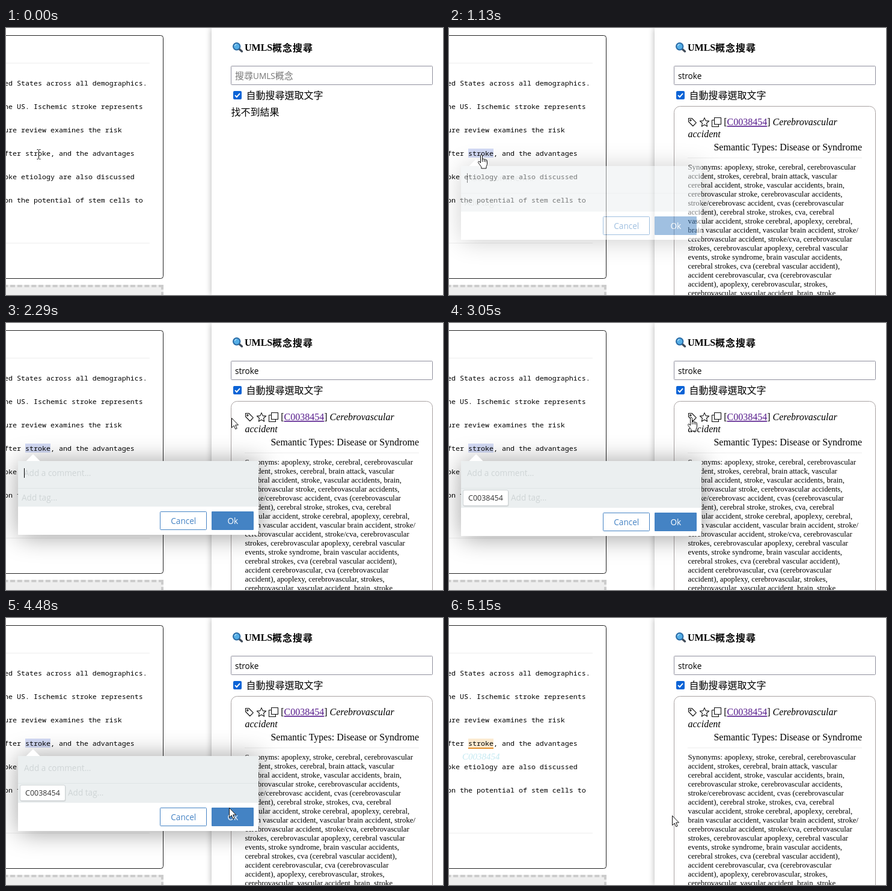
An HTML page that plays this animation: 727x445 px, repeating every 5610 ms.

```html
<!DOCTYPE html>
<html lang="zh-Hant">
<head>
<meta charset="utf-8">
<title>UMLS概念搜尋</title>
<style>
html, body { margin: 0; width: 100%; height: 100%; overflow: hidden; background: #fff; }
#stage { position: absolute; left: 0; top: 0; width: 727px; height: 445px; overflow: hidden; background: #fff; }
#stage > *, #popup > * { position: absolute; left: 0; top: 0; }
svg { display: block; width: 727px; height: 445px; }
#drop { left: -40px; top: 428px; width: 294px; height: 60px; border: 4px dashed #ccc; background: #eee; }
#panel { left: 342px; width: 400px; height: 445px; background: #fff; box-shadow: 0 0 10px rgba(0,0,0,.3); }
#popup { width: 727px; height: 445px; }
#box { left: 20px; top: 230px; width: 400px; height: 123px; background: #fff; box-shadow: 2px 2px 42px rgba(0,0,0,.4); }
text { white-space: pre; }
.mono { font: 11.667px "Noto Sans Mono", monospace; }
.serif { font: 16px "Liberation Serif", serif; }
.small { font: 12.8px "Liberation Serif", serif; }
.cjk { font: 16px "Noto Sans CJK TC", "Noto Sans CJK JP", sans-serif; }
.sans { font: 13.6px "Open Sans", "Noto Sans", sans-serif; }
.hint { fill: #cfd5d6; }
.line { fill: none; stroke: #111; stroke-width: 1.1; stroke-linejoin: round; }
</style>
</head>
<body>
<div id="stage">
  <div id="drop"></div>
  <div id="panel"></div>
  <svg id="page">
    <rect x="-20.5" y="12.5" width="282" height="405" rx="4" fill="#fff" stroke="#222"/>
    <path d="M0 58.5H239M0 358.5H239" stroke="#eee"/>
    <rect id="mark" x="32" y="201" width="42" height="15"/>
    <path id="under" d="M32 217H74" stroke="#e5912d" stroke-width="2"/>
    <g id="article" class="mono"></g>
    <text id="label" x="22" y="236" class="serif" style="font-size:15px;font-style:italic" fill="#c4e9f1">C0038454</text>

    <path d="M388.5 35.5L392.5 39" stroke="#3f4a57" stroke-width="3.4" stroke-linecap="round"/>
    <circle cx="383.7" cy="30.7" r="5.7" fill="#55aee6" stroke="#2b6ca6" stroke-width="2"/>
    <path d="M380.5 30a3.6 3.6 0 0 1 3-2.8" fill="none" stroke="#b7e0f8" stroke-width="1.2"/>
    <text x="397" y="38" class="serif" font-weight="700" style="font-weight:700">UMLS</text>
    <text x="443" y="39" class="cjk" style="font-weight:700;letter-spacing:1px">概念搜尋</text>

    <rect x="374.5" y="63.5" width="335" height="31" rx="1" fill="#fff" stroke="#8f8f9d"/>
    <text id="empty" x="381" y="85" class="cjk" style="font-size:15px" fill="#757575">搜尋<tspan class="sans">UMLS</tspan>概念</text>
    <text id="query" x="381" y="85" class="sans">stroke</text>
    <rect x="378" y="105" width="14" height="14" rx="2" fill="#0a63d6"/>
    <path d="M381 112.2l2.8 2.8 5.2-5.8" fill="none" stroke="#fff" stroke-width="1.9"/>
    <text x="399.5" y="118" class="cjk">自動搜尋選取文字</text>
    <text id="none" x="374.5" y="146" class="cjk">找不到結果</text>

    <g id="result">
      <rect x="374.5" y="130.5" width="335" height="400" rx="10" fill="#fff" stroke="#a8a2a2"/>
      <path class="line" d="M398.5 150.5h5.5l7.3 7.3-5.5 5.7-7.3-7.5z"/>
      <circle class="line" cx="401.8" cy="153.8" r="1.2"/>
      <path id="star" class="line"/>
      <path class="line" d="M441.5 149.5h11v11h-11zM441 153.5h-3.5v11h11V161"/>
      <text x="457.2" y="162" class="serif">[<tspan fill="#551a8b" text-decoration="underline">C0038454</tspan>] <tspan font-style="italic">Cerebrovascular</tspan></text>
      <text x="397.5" y="182" class="serif" style="font-style:italic">accident</text>
      <text x="687" y="204" class="serif" text-anchor="end">Semantic Types: Disease or Syndrome</text>
      <path d="M397 216.5H687" stroke="#eee"/>
      <g id="synonyms" class="small"></g>
    </g>
  </svg>

  <div id="popup">
    <div id="box"></div>
    <svg>
      <path d="M33 230.5l12-12 12 12z" fill="#fff"/>
      <rect id="field" x="20" y="230" width="400" height="76" fill="#ebeff0"/>
      <path d="M20 275.5H420" stroke="#dfe5e6"/>
      <text x="30" y="255" class="sans hint">Add a comment...</text>
      <path id="caret" d="M30.5 242V258" stroke="#000"/>
      <text id="tagHint" y="296" class="sans hint">Add tag...</text>
      <g id="tag">
        <rect x="23.5" y="279" width="76" height="27" rx="3" fill="#000" opacity=".1"/>
        <rect x="23.5" y="278.5" width="75" height="26" rx="2.5" fill="#fff" stroke="#cfd4d6"/>
        <text x="32" y="295.5" class="sans" style="font-size:12.5px" fill="#333">C0038454</text>
      </g>
      <g id="footer">
        <rect x="256.5" y="314.5" width="77" height="30" rx="1" fill="#fff" stroke="#4483c4"/>
        <text x="295.3" y="335" class="sans" text-anchor="middle" fill="#4483c4">Cancel</text>
        <rect id="ok" x="342" y="314" width="70" height="31" rx="1"/>
        <text x="377.3" y="335" class="sans" text-anchor="middle" fill="#fff">Ok</text>
      </g>
    </svg>
  </div>

  <svg>
    <circle id="press" r="12" fill="#ff0" opacity=".6"/>
    <g id="pointer">
      <path id="beam" d="M-.5-8.5H1.5L2.5-7.5 3.5-8.5H5.5M2.5-7.5V6.5M-.5 7.5H1.5L2.5 6.5 3.5 7.5H5.5" fill="none" stroke="#111"/>
      <path id="arrow" d="M.5.5V16.5L4.2 13 6.7 18.8 9.2 17.7 6.7 12H11.5z" fill="#fff" stroke="#111"/>
      <g id="hand">
        <path d="M.5 1.8C.5-.1 3.5-.1 3.5 1.8V8C4 6.5 6.4 6.8 6.5 8.5 7 7.2 9 7.6 9.2 9.2 9.8 8.2 11.5 8.8 11.5 10.3V15C11.5 17.5 10.3 19 10 20V23H1.8V20.5C0 18 -2 15.5 -3.3 13.5 -4.2 11.8 -2.2 10.6 -1 12L.5 13.7z" fill="#fff" stroke="#111" stroke-linejoin="round"/>
        <path d="M3.5 8V12M6.5 8.5V12M9.2 9.2V12.5" stroke="#111"/>
      </g>
    </g>
  </svg>
</div>
<script>
const LOOP = 5610;
const $ = id => document.getElementById(id);
const show = (id, on) => { $(id).style.display = on ? '' : 'none'; };
const within = (t, a, b) => t >= a && t < b;

function addLines(id, x, y, step, lines) {
  lines.forEach((line, i) => {
    const el = document.createElementNS('http://www.w3.org/2000/svg', 'text');
    el.setAttribute('x', x);
    el.setAttribute('y', y + i * step);
    el.textContent = line;
    $(id).append(el);
  });
}

addLines('article', -3, 96, 39, [
  'ed States across all demographics.',
  'he US. Ischemic stroke represents',
  'ure review examines the risk',
  'fter stroke, and the advantages',
  'oke etiology are also discussed',
  'on the potential of stem cells to'
]);
addLines('synonyms', 397.5, 236, 15, [
  'Synonyms: apoplexy, stroke, cerebral, cerebrovascular',
  'accident, strokes, cerebral, brain attack, vascular',
  'cerebral accident, stroke, vascular accidents, brain,',
  'cerebrovascular stroke, cerebrovascular accidents,',
  'stroke/cerebrovasc accident, cvas (cerebrovascular',
  'accident), cerebral stroke, strokes, cva, cerebral',
  'vascular accident, stroke cerebral, apoplexy, cerebral,',
  'brain vascular accident, vascular brain accident, stroke/',
  'cerebrovascular accident, stroke/cva, cerebrovascular',
  'strokes, cerebrovascular apoplexy, cerebral vascular',
  'events, stroke syndrome, brain vascular accidents,',
  'cerebral strokes, cva (cerebral vascular accident),',
  'accident cerebrovascular, cva (cerebrovascular',
  'accident), apoplexy, cerebrovascular, strokes,',
  'cerebrovascular, vascular accident, brain, stroke'
]);

$('star').setAttribute('d', 'M' + Array.from({ length: 10 }, (_, i) => {
  const a = i * Math.PI / 5, r = i % 2 ? 3.7 : 8;
  return (425 + r * Math.sin(a)).toFixed(2) + ' ' + (157.6 - r * Math.cos(a)).toFixed(2);
}).join('L') + 'z');

const smooth = p => p * p * (3 - 2 * p);
const out = k => p => 1 - (1 - p) ** k;
const home = [52, 211];
const moves = [
  { from: 1530, to: 2080, steps: 9, end: [324, 166], ex: smooth, ey: smooth },
  { from: 2150, to: 2650, steps: 8, end: [401, 157], ex: out(2.3), ey: out(6) },
  { from: 3780, to: 4340, steps: 9, end: [373, 291], ex: smooth, ey: smooth },
  { from: 4410, to: 4620, steps: 4, end: [371, 329], ex: out(4), ey: out(1.55) }
];

function position(t) {
  let [x, y] = home;
  for (const m of moves) {
    if (t < m.from) break;
    const k = Math.floor((t - m.from) / (m.to - m.from) * (m.steps - 1) + 0.15);
    const p = Math.min(1, (k + 1) / m.steps);
    x += (m.end[0] - x) * m.ex(p);
    y += (m.end[1] - y) * m.ey(p);
  }
  return [Math.round(x), Math.round(y)];
}

function pointerKind(t, x, y) {
  if (t < 1130) return 'beam';
  if (x < 74 && y > 200) return 'hand';
  if (x < 120 && y > 200) return 'beam';
  if (x >= 398 && y < 166) return 'hand';
  if (within(t, 4550, 5150)) return 'hand';
  return y >= 230 && y < 308 ? 'beam' : 'arrow';
}

const presses = [[730, 860], [930, 1060], [2910, 3050], [5020, 5150]];
const fade = [[1270, 1], [1200, 0.8], [1130, 0.5], [1060, 0.2]];

function draw(t) {
  const found = t >= 1130, tagged = t >= 3050, saved = t >= 5150;
  show('empty', !found);
  show('none', !found);
  show('query', found);
  show('result', found);

  show('mark', t >= 930);
  $('mark').setAttribute('fill', saved ? '#fbead0' : '#d3daf5');
  show('under', saved);
  show('label', saved);

  show('popup', t >= 1060 && !saved);
  $('popup').style.opacity = (fade.find(f => t >= f[0]) || [0, 0])[1];
  const grow = tagged ? 2 : 0;
  $('box').style.height = 123 + grow + 'px';
  $('field').setAttribute('height', 76 + grow);
  $('footer').setAttribute('transform', `translate(0 ${grow})`);
  $('tagHint').setAttribute('x', tagged ? 103 : 26);
  show('tag', tagged);
  show('caret', within(t, 1130, 1650) || within(t, 2150, 2650));
  $('ok').setAttribute('fill', t >= 4550 ? '#4f92d7' : '#4483c4');

  const [x, y] = position(t), kind = pointerKind(t, x, y);
  for (const id of ['beam', 'arrow', 'hand']) show(id, id === kind);
  $('pointer').setAttribute('transform', `translate(${x} ${y})`);
  $('press').setAttribute('cx', x);
  $('press').setAttribute('cy', y - 0.5);
  show('press', presses.some(p => within(t, ...p)));
}

const start = performance.now();
function tick() {
  draw((performance.now() - start) % LOOP);
  requestAnimationFrame(tick);
}
tick();
</script>
</body>
</html>
```
